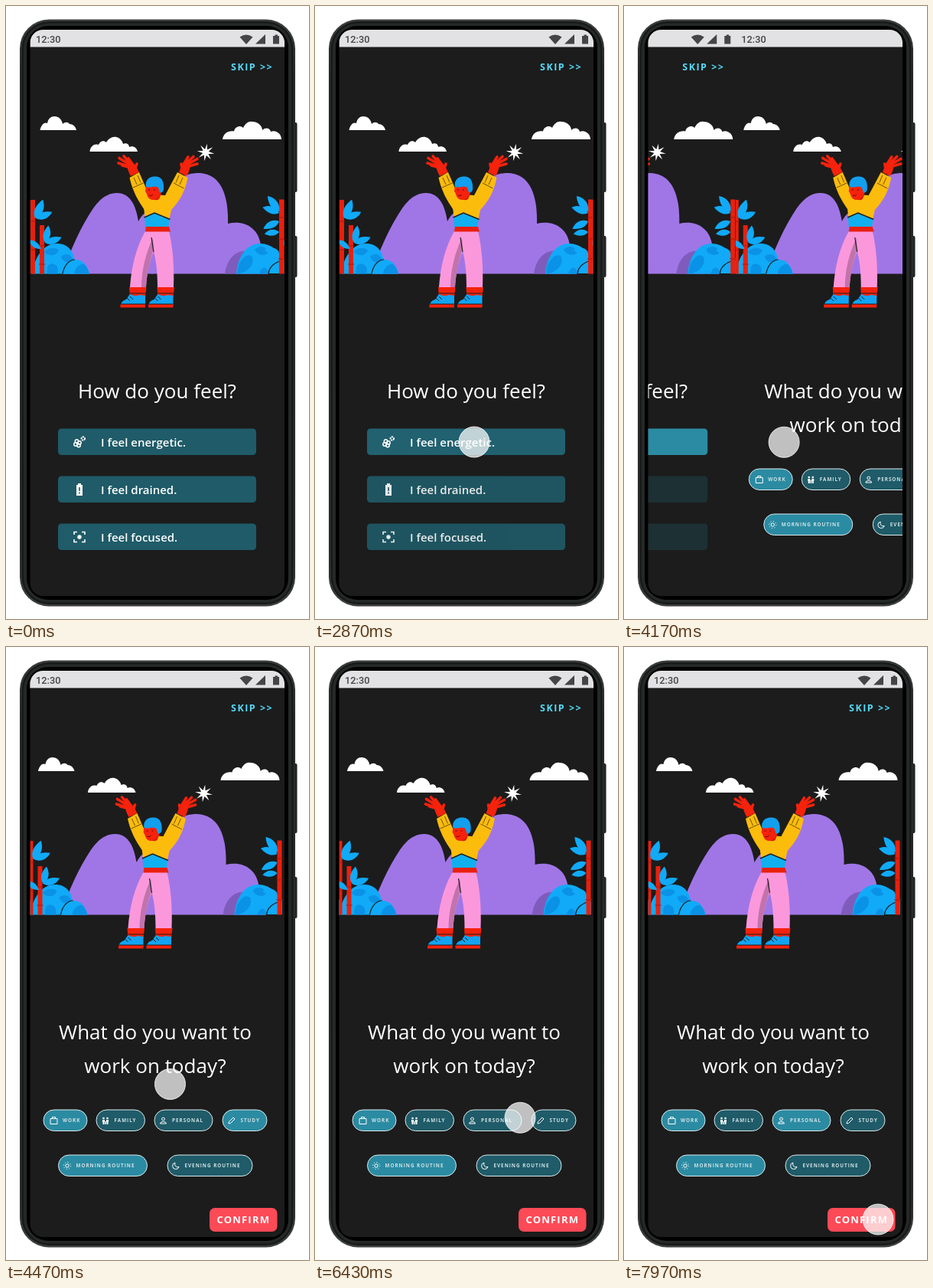
Write an HTML page that moves like this. It is 396 px wide and 800 px high and loops after 8 s.

```html
<!DOCTYPE html>
<html lang="en">
<head>
<meta charset="utf-8">
<title>Onboarding</title>
<style>
html, body { margin: 0; width: 100%; height: 100%; overflow: hidden; background: #fff; }
svg { display: block; width: 396px; height: 800px; font-family: "Open Sans", sans-serif; }
.head { font-size: 26px; fill: #fff; text-anchor: middle; }
.opt { font-size: 15px; font-weight: 600; fill: #fff; }
.chip text { font-size: 6.3px; font-weight: 700; letter-spacing: 1px; fill: #cfe2e6; }
.line { fill: none; stroke: #fff; stroke-width: 1; }
</style>
</head>
<body>
<svg viewBox="0 0 396 800">
<defs>
  <clipPath id="screen"><rect x="31.5" y="31" width="332.5" height="739" rx="17"/></clipPath>
  <clipPath id="page"><rect x="31.5" y="31" width="332.5" height="739"/></clipPath>
  <linearGradient id="metal" x1="0" y1="0" x2="0" y2="1">
    <stop offset="0" stop-color="#3a3d3b"/><stop offset=".1" stop-color="#262a28"/>
    <stop offset=".9" stop-color="#2a2e2c"/><stop offset="1" stop-color="#3b3f3d"/>
  </linearGradient>

  <path id="leaf" d="M0 0C4-7 12-9 22-6C17 2 8 5 0 0Z" fill="#10aaf8"/>

  <g id="status">
    <rect x="31" y="31" width="333.500" height="22.500" fill="#e2e2e4"/>
    <g fill="#454548">
      <text x="39" y="48" font-family="Roboto, sans-serif" font-size="12.8" font-weight="500">12:30</text>
      <path d="M305.500 40.500Q314 34.500 322.500 40.500L314 50Z"/>
      <path d="M326 49.500H339V37Z"/>
      <path d="M349 39H351.500V37.500H355V39H357V49.500H349Z"/>
    </g>
    <text x="294" y="84" font-size="12.5" font-weight="700" letter-spacing="1.5" fill="#55dcfa">SKIP &gt;&gt;</text>
  </g>

  <g id="art">
    <g fill="#fff">
      <path d="M44.500 162C46 154 51 151 54 153C55 147 59 144 63 144C69 144 73 148 74 154C77 151 81 151 83 154C88 154 91 158 92 162Z"/>
      <path d="M109.500 190C110 182 117 179 121 181C123 176 128 175 131 178C134 173 139 170 144 171C149 172 152 176 153 180C158 178 161 181 161 184C166 182 171 185 172 190Z"/>
      <path d="M283 174C284 166 291 162 298 163.500C299 157 307 155 310 159C313 153 317 150 322 151C330 151 335 157 335 162C339 158 345 159 346 164C353 161 360 167 360 174Z"/>
      <path id="star"/>
    </g>

    <g fill="#a076e6">
      <path d="M74 349.500C84 318 98 288 114 264C124 250 134 244 145 244C160 244 169 256 173 281C178 272 184 266 192 266V349.500Z"/>
      <path d="M190 349.500V280C204 280 209 264 214 245C220 226 234 218 252 218C280 219 291 245 290 284C312 279 330 290 333 312L345 349.500Z"/>
    </g>

    <path d="M286 349.500C289 327 304 315 322 321V349.500Z" fill="#7f5cbc"/>
    <path d="M301 349.500C303 326 315 310 332 310C348 310 357 322 364 330V349.500Z" fill="#10aaf8"/>
    <path d="M304 338C310 326 318 322 322 328C325 338 315 349 302 349.500ZM325 318C331 311 340 314 343 321C340 327 329 326 325 318ZM331 349.500C334 340 340 338 344 349.500Z" fill="#0a92e6"/>
    <path d="M343 349.500C344 340 350 335 364 331V349.500Z" fill="#10aaf8" stroke="#1c1c1c" stroke-width="1.200"/>

    <path d="M34 349.500C37 328 49 310 66 310C82 310 91 320 92 349.500Z" fill="#10aaf8"/>
    <path d="M50 321C56 314 66 315 69 319C66 326 57 328 50 321ZM72 327C79 321 86 325 88 332C82 337 75 335 72 327ZM54 349.500C52 337 59 333 66 339C69 343 68 347 67 349.500Z" fill="#0a92e6"/>
    <path d="M74 349.500C76 338 83 331 91 331C101 331 107 340 109 349.500Z" fill="#10aaf8"/>
    <path d="M89 349.500C90 341 97 336 102 337C107 342 108 346 109 349.500Z" fill="#0a92e6"/>
    <path d="M74 349.500C76 338 83 331 90 331" fill="none" stroke="#1c1c1c" stroke-width="1.200"/>

    <path d="M32 253H38V349.500H32ZM44 286H50V349.500H44ZM357 252.500H363V349.500H357Z" fill="#e9200d"/>
    <path d="M31 281H39M31 318H39M43 313H51M43 337H51M356 276H364M356 304H364M356 330H364" stroke="#b01208" stroke-width="1"/>
    <g id="leaves"></g>

    <g fill="none" stroke="#f5220c" stroke-linecap="round" stroke-width="3.600">
      <path d="M166 211L147 205M165 209L148 198.500M166 209L154 196M168 210L160 199M169 212L171 206M167 212L152 208"/>
      <path d="M232 211L250 206M233 209L250 199.500M232 209L245 196.500M230 210L238 197M230 212L229 206"/>
    </g>
    <path d="M158 206L169 207L174 217L163 222Q158 213 158 206ZM241 206L230 207L226 217L236 222Q241 214 241 206Z" fill="#f5220c"/>

    <g fill="#fcbc0c">
      <path d="M161.500 224L174 217L187 247L181 266C174 256 166 244 161.500 224Z"/>
      <path d="M237.500 224L224 217L208 247L216 266C225 256 233 246 237.500 224Z"/>
      <path d="M182 250C188 246 206 245 213 249L217 262L213 280L182 280L180 262Z"/>
    </g>
    <path d="M166 237L179.500 231M232.500 238L219 231M167 224L171 233M172 221L176 230.500M231 224L227 233M226 221L222 230.500" stroke="#4a3508" stroke-width=".8"/>
    <path d="M181 276L195 270L214 278L212 289H182Z" fill="#10b0f0"/>
    <path d="M180.500 276L194 270L214.500 278.500" fill="none" stroke="#1c1c1c" stroke-width="1.400"/>

    <path d="M192 245H203L200 252Q196 255 190 251Z" fill="#d91a0a"/>
    <path d="M183 235C183 228 203 228 204 238C203 247 198 253 191 253C184 252 185 245 182 242Z" fill="#f5220c"/>
    <path d="M183 236C181 227 188 221.500 196 222.500C204 223 207 230 206 240C205 243 203 244 201 243L199 237C194 234 189 238 183 236Z" fill="#129fee"/>
    <path d="M186 240H188M193 240H195M187 247Q190 249 192 246" fill="none" stroke="#5c0c08" stroke-width="1"/>

    <path d="M182 294H213C218 315 220 340 219 367H198C198 345 196 332 193 320C187 335 184 350 183 367H162C164 340 170 315 182 294Z" fill="#fb98dc"/>
    <path d="M192 303C193 312 193 318 191 324C186 340 184 353 183 367H177C177 345 183 321 192 303Z" fill="#c273ab"/>
    <path d="M190 302L193 321" stroke="#1c1c1c" stroke-width="1.200"/>
    <path d="M183 288H213L215 294.500H182Z" fill="#e9200d"/>
    <g id="boot">
      <path d="M161 367H183.500L182 380H162Z" fill="#f5220c"/>
      <path d="M162 375H183" stroke="#1c1c1c"/>
      <path d="M162 376Q170 380 174 377L182 378V391H150Q150 385 157 383Z" fill="#12a4f2"/>
      <path d="M149.500 389H182V393.500H149.500Z" fill="#f5220c"/>
      <path d="M158 381L162 385M162 379L166 383M149.500 389H182" stroke="#1c1c1c" stroke-width="1"/>
    </g>
    <use href="#boot" x="36.500"/>
  </g>
</defs>

<g id="phone">
  <rect x="375" y="152" width="5.500" height="91" rx="2" fill="#202422"/>
  <rect x="375" y="300" width="5.500" height="54" rx="2" fill="#202422"/>
  <rect x="18" y="17.500" width="360" height="766" rx="38" fill="url(#metal)"/>
  <rect x="20.500" y="20" width="355" height="761" rx="36" fill="#171a19"/>
  <rect x="23" y="22.500" width="350" height="756" rx="33" fill="#252927"/>
  <rect x="27" y="26" width="342" height="749" rx="28" fill="#000"/>
</g>

<g clip-path="url(#screen)">
  <rect x="31" y="31" width="334" height="740" fill="#1c1c1c"/>
  <g id="page1"><g clip-path="url(#page)">
    <use href="#art"/>
    <use href="#status"/>
    <text class="head" x="197.500" y="512">How do you feel?</text>
    <g id="options"></g>
  </g></g>
  <g id="page2"><g clip-path="url(#page)">
    <use href="#art" x="-2.500"/>
    <use href="#status"/>
    <text class="head" x="195" y="512">What do you want to</text>
    <text class="head" x="195" y="556">work on today?</text>
    <g id="chips"></g>
    <rect x="266" y="732" width="88.500" height="31" rx="7" fill="#fd4a57"/>
    <text x="275.500" y="752" font-size="13" font-weight="700" letter-spacing="1.2" fill="#fff">CONFIRM</text>
  </g></g>
</g>

<circle id="touch" r="20" fill="#fff" fill-opacity=".72" stroke="#fff" stroke-opacity=".8"/>
<path id="cursor" d="M0 0V15L3.500 11.800L6 17.500L8.500 16.400L6 10.800H10.800Z" fill="#000" stroke="#fff" stroke-width="1"/>
</svg>

<script>
const LOOP = 8000, PAGE = 332;
const DARK = [31, 91, 104], LIT = [43, 139, 162];
const $ = id => document.getElementById(id);

const clamp = v => Math.max(0, Math.min(1, v));
const span = (t, from, to) => clamp((t - from) / (to - from));
const lerp = (a, b, p) => a + (b - a) * p;
const cubicInOut = p => p < .5 ? 4 * p ** 3 : 1 - 4 * (1 - p) ** 3;
const cubicOut = p => 1 - (1 - p) ** 3;
const tint = p => `rgb(${DARK.map((c, i) => Math.round(lerp(c, LIT[i], p)))})`;
const shift = (el, x, y) => el.setAttribute('transform', `translate(${x} ${y})`);

// cubic-bezier(.42, 0, .58, 1)
function easeInOut(p) {
  let lo = 0, hi = 1, s = .5;
  for (let i = 0; i < 22; i++) {
    s = (lo + hi) / 2;
    const x = 1.26 * s * (1 - s) ** 2 + 1.74 * s * s * (1 - s) + s ** 3;
    if (x < p) lo = s; else hi = s;
  }
  return s * s * (3 - 2 * s);
}

const points = Array.from({ length: 16 }, (_, i) => {
  const a = i * Math.PI / 8 + .15, r = i % 2 ? 4 : 11.5;
  return `${261 + r * Math.cos(a)} ${191 + r * Math.sin(a)}`;
});
$('star').setAttribute('d', `M${points.join('L')}Z`);

// x, y, angle, scale
$('leaves').innerHTML = [
  [38, 277, -52, 1.15], [39, 277, -6, 1], [51, 309, -64, 1], [51, 309, -3, 1],
  [31, 306, 52, .8], [357, 268, -112, 1.1], [357, 270, -146, 1],
  [357, 281, 170, 1], [357, 295, 188, .85], [357, 321, -158, .85]
].map(([x, y, a, s]) => `<use href="#leaf" transform="translate(${x} ${y}) rotate(${a}) scale(${s})"/>`).join('');

const optionIcons = [
  `<g fill="none" stroke="#fff" stroke-width="1.500"><circle cx="-3.500" cy="-1" r="2.200"/><circle cx="0" cy="1" r="2.200"/>
   <circle cx="-1" cy="4.500" r="2.200"/><circle cx="-5" cy="3" r="2.200"/><circle cx="4.800" cy="-4.500" r="2.200" stroke-dasharray="2 .8" stroke-width="2"/></g>`,
  `<path d="M-4-6H-2V-8H2V-6H4V8H-4Z" fill="#fff"/><path d="M0-3V2M0 3.500V5.500" stroke="#1f5b68" stroke-width="1.600"/>`,
  `<circle r="2.700" fill="#fff"/><path d="M-7-3V-6.500H-3M3-6.500H7V-3M7 3V6.500H3M-3 6.500H-7V3" fill="none" stroke="#fff" stroke-width="1.600"/>`
];
$('options').innerHTML = ['energetic', 'drained', 'focused'].map((mood, i) => {
  const y = 551.5 + i * 62;
  return `<g><rect x="68" y="${y}" width="259" height="34.500" rx="4.500"/>
    <g transform="translate(96 ${y + 17.5})">${optionIcons[i]}</g>
    <text class="opt" x="124" y="${y + 23}">I feel ${mood}.</text></g>`;
}).join('');
const options = [...$('options').children];

const chipIcons = {
  case: '<path class="line" d="M-4.500-2.500H4.500V4.500H-4.500ZM-2-2.500V-4.500H2V-2.500"/>',
  people: '<path d="M-4-1H-1V2H-1.500V5H-3.500V2H-4ZM1-1H4V2H3.500V5H1.500V2H1ZM-.7 1H.7V5H-.7Z" fill="#fff"/><circle cx="-2.500" cy="-3" r="1.300" fill="#fff"/><circle cx="2.500" cy="-3" r="1.300" fill="#fff"/>',
  user: '<circle class="line" cy="-2" r="1.900"/><path class="line" d="M-4 4Q-4 1.500 0 1.500T4 4Z"/>',
  pen: '<path class="line" d="M-4 4L-3.500 1.500L2-4L4-2L-1.500 3.500Z"/>',
  sun: '<circle class="line" r="2.200"/><circle class="line" r="4.600" stroke-dasharray="1.200 2.400" stroke-width="1.500"/>',
  moon: '<path class="line" d="M-1-4A4.300 4.300 0 1 0 4 1.500A4 4 0 0 1-1-4Z"/>'
};
// label, icon, left, top, width, text x
$('chips').innerHTML = [
  ['WORK', 'case', 49, 604, 57, 74], ['FAMILY', 'people', 118, 604, 63.5, 141.5],
  ['PERSONAL', 'user', 194, 604, 76, 217], ['STUDY', 'pen', 283, 604, 58, 306.5],
  ['MORNING ROUTINE', 'sun', 68.5, 663, 116, 91.5], ['EVENING ROUTINE', 'moon', 211, 663, 111, 233.5]
].map(([label, icon, x, y, w, tx]) =>
  `<g class="chip"><rect x="${x}" y="${y}" width="${w}" height="27.500" rx="13.700" stroke="#dcebee"/>
   <g transform="translate(${tx - 11.5} ${y + 14})">${chipIcons[icon]}</g>
   <text x="${tx}" y="${y + 16}">${label}</text></g>`).join('');
const chips = [...$('chips').querySelectorAll('.chip > rect')];

// start, end, x, y, easing
const touchMoves = [
  [4050, 4470, 214.5, 570.5, easeInOut], [4610, 5410, 300, 612, cubicOut],
  [6310, 7130, 216, 618, cubicOut], [7150, 7960, 332, 747, cubicOut]
];
const cursorMoves = [
  [450, 1280, 212, 555.5, cubicOut], [1290, 1510, 209.5, 565, easeInOut], [1660, 1740, 209, 566, easeInOut]
];
const follow = (t, x, y, moves) => moves.reduce((at, [from, to, mx, my, ease]) => {
  const p = ease(span(t, from, to));
  return [lerp(at[0], mx, p), lerp(at[1], my, p)];
}, [x, y]);

function draw(t) {
  const slide = PAGE * easeInOut(span(t, 3783, 4438));
  shift($('page1'), -slide, 0);
  shift($('page2'), PAGE - slide, 0);

  const pick = cubicInOut(span(t, 2630, 3380));
  options.forEach((el, i) => {
    el.firstChild.setAttribute('fill', tint(i ? 0 : pick));
    el.setAttribute('opacity', i ? lerp(1, .32, pick) : 1);
  });

  const study = 1 - easeInOut(span(t, 5480, 6300));
  const personal = easeInOut(span(t, 6620, 7130));
  [1, 0, personal, study, 1, 0].forEach((p, i) => chips[i].setAttribute('fill', tint(p)));

  const press = easeInOut(span(t, 1920, 2280));
  shift($('touch'), ...follow(t, 208, 569, touchMoves));
  $('touch').setAttribute('opacity', press);
  shift($('cursor'), ...follow(t, -14, 640, cursorMoves));
  $('cursor').setAttribute('opacity', 1 - press);
}

const begin = performance.now();
(function tick() {
  draw((performance.now() - begin) % LOOP);
  requestAnimationFrame(tick);
})();
</script>
</body>
</html>
```
